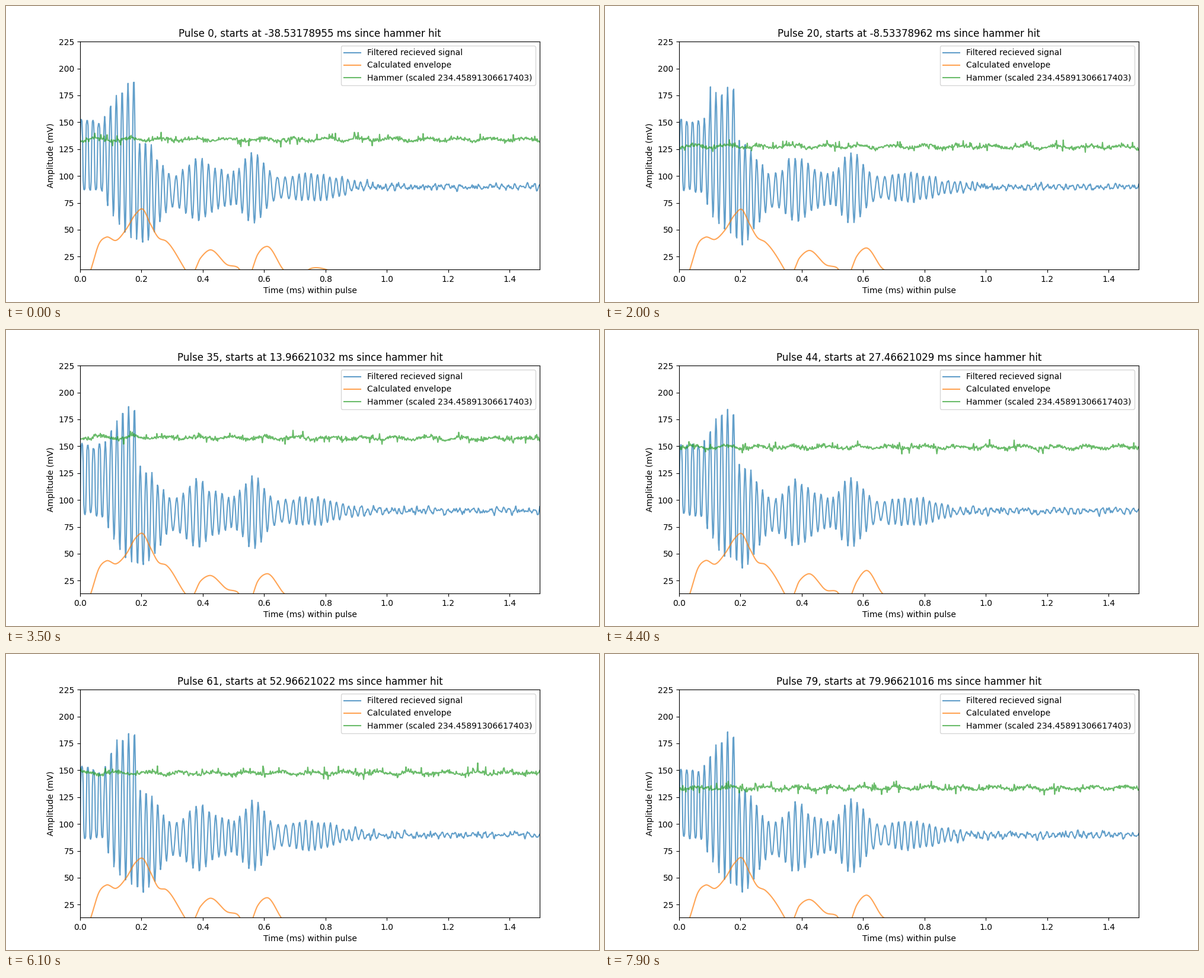
A matplotlib script that plays this animation: 1000x500 px, repeating every 8 s.

```python
import matplotlib.pyplot as plt
import numpy as np
from matplotlib.animation import FuncAnimation

FRAMES, INTERVAL = 80, 100
DT = 0.002                        # sample spacing in ms
t = np.arange(750) * DT

# The carrier is nearly regular but slips where two echoes meet
CREST_NO = [-1, 15, 16, 24, 26, 31, 34, 77]
CREST_T = [-0.013, 0.291, 0.315, 0.484, 0.52, 0.6205, 0.695, 1.561]

# Key points of the envelope curve
ENV_T = [0, 0.035, 0.062, 0.085, 0.118, 0.15, 0.182, 0.204, 0.228, 0.254, 0.281,
         0.342, 0.357, 0.393, 0.42, 0.482, 0.511, 0.55, 0.579, 0.608, 0.666,
         0.7, 0.757, 0.84, 1.5]
ENV_Y = [-15, 13, 37, 43.2, 40.4, 50, 64.5, 68.5, 56.5, 42.5, 38.5,
         13, 7, 24, 30.5, 17, 15.3, 5, 25, 32.7, 13,
         9, 12, 8, 0]

# Slow hammer level over the time since the hit, in ms
HAMMER_T = [-38.5, -20, -7, 0, 2, 14, 24, 54, 80]
HAMMER_Y = [134, 133, 127, 126, 163, 158.3, 149.5, 147.5, 133.5]


def spline(x, px, py):
    """Cubic Hermite curve through the given points."""
    px, py = np.array(px), np.array(py)
    m = np.gradient(py, px)
    i = np.clip(np.searchsorted(px, x, side="right") - 1, 0, len(px) - 2)
    h = px[i + 1] - px[i]
    s = (x - px[i]) / h
    return ((1 + 2 * s) * (1 - s) ** 2 * py[i] + s * (1 - s) ** 2 * h * m[i]
            + s * s * (3 - 2 * s) * py[i + 1] + s * s * (s - 1) * h * m[i + 1])


def lobe(center, width, height):
    return height * np.exp(-((t - center) / width) ** 2)


def slip(n):
    """The trigger comes one sample earlier from pulse 14 on."""
    return DT * (n >= 14)


def start_time(n):
    return -38.53178955 + 1.5 * n - 3.7e-9 * n - slip(n)


def received(n, rng):
    # Direct pulse first, then decaying echoes
    direct = t < 0.187
    swell = 32 + 44 * (1 - np.exp(-np.maximum(t - 0.075, 0) / 0.05))
    echoes = (lobe(0.2, 0.08, 46) + lobe(0.385, 0.062, 29) + lobe(0.468, 0.035, 9)
              + lobe(0.563, 0.055, 31) + lobe(0.75, 0.115, 12) + 1.6)
    amp = np.where(direct, swell, echoes)
    mid = np.where(direct, 120 - 32 * t, 90 - 6 * np.exp(-(t - 0.187) / 0.25))

    phase = np.interp(t + DT - slip(n), CREST_T, CREST_NO)
    wave = np.cos(2 * np.pi * phase)
    wave = np.where(t < 0.075, np.tanh(2.2 * wave) / np.tanh(2.2), wave)
    sway = 1 + np.interp(phase, np.arange(-1, 79), rng.normal(0, 0.04, 80))

    noise = np.convolve(rng.normal(0, 1, len(t) + 2), [0.3, 0.8, 0.3], "valid")
    y = mid + amp * sway * wave + noise * np.interp(t, [0.8, 0.9, 1.5], [0.7, 1.7, 1.2])
    if rng.random() < 0.4:
        y[rng.integers(26, 56)] += rng.choice([-1, 1]) * rng.uniform(15, 40)
    return y


def envelope(n, rng):
    spread = np.interp(ENV_T, [0, 0.3, 0.8], [0.1, 0.6, 1.5])
    return spline(t, ENV_T, ENV_Y + rng.normal(0, 1, len(ENV_T)) * spread)


def hammer(n, rng):
    level = np.interp(start_time(n) + t, HAMMER_T, HAMMER_Y)
    ripple = 1.3 * np.sin(2 * np.pi * t / 0.107 + rng.uniform(0, 2 * np.pi))
    noise = rng.normal(0, 0.95, len(t))
    spikes = (rng.random(len(t)) < 0.07) * rng.choice([-1, 1, 1], len(t))
    return level + ripple + noise + spikes * rng.uniform(2, 5.5, len(t))


fig, ax = plt.subplots(figsize=(10, 5), dpi=100)
labels = ["Filtered recieved signal", "Calculated envelope",
          "Hammer (scaled 234.45891306617403)"]
lines = [ax.plot(t, np.full(len(t), 90.0), alpha=0.7, label=s)[0] for s in labels]
ax.set_xlim(0, t[-1])
ax.set_ylim(13.1, 225.1)
ax.set_xlabel("Time (ms) within pulse")
ax.set_ylabel("Amplitude (mV)")
ax.legend(loc="upper right")
title = ax.set_title("")


def update(n):
    rng = np.random.default_rng(100 + n)
    for line, curve in zip(lines, (received, envelope, hammer)):
        line.set_ydata(curve(n, rng))
    title.set_text(f"Pulse {n}, starts at {start_time(n):.8f} ms since hammer hit")
    return [*lines, title]


anim = FuncAnimation(fig, update, frames=FRAMES, interval=INTERVAL,
                     repeat=True, repeat_delay=0, blit=False)
plt.show()
```
